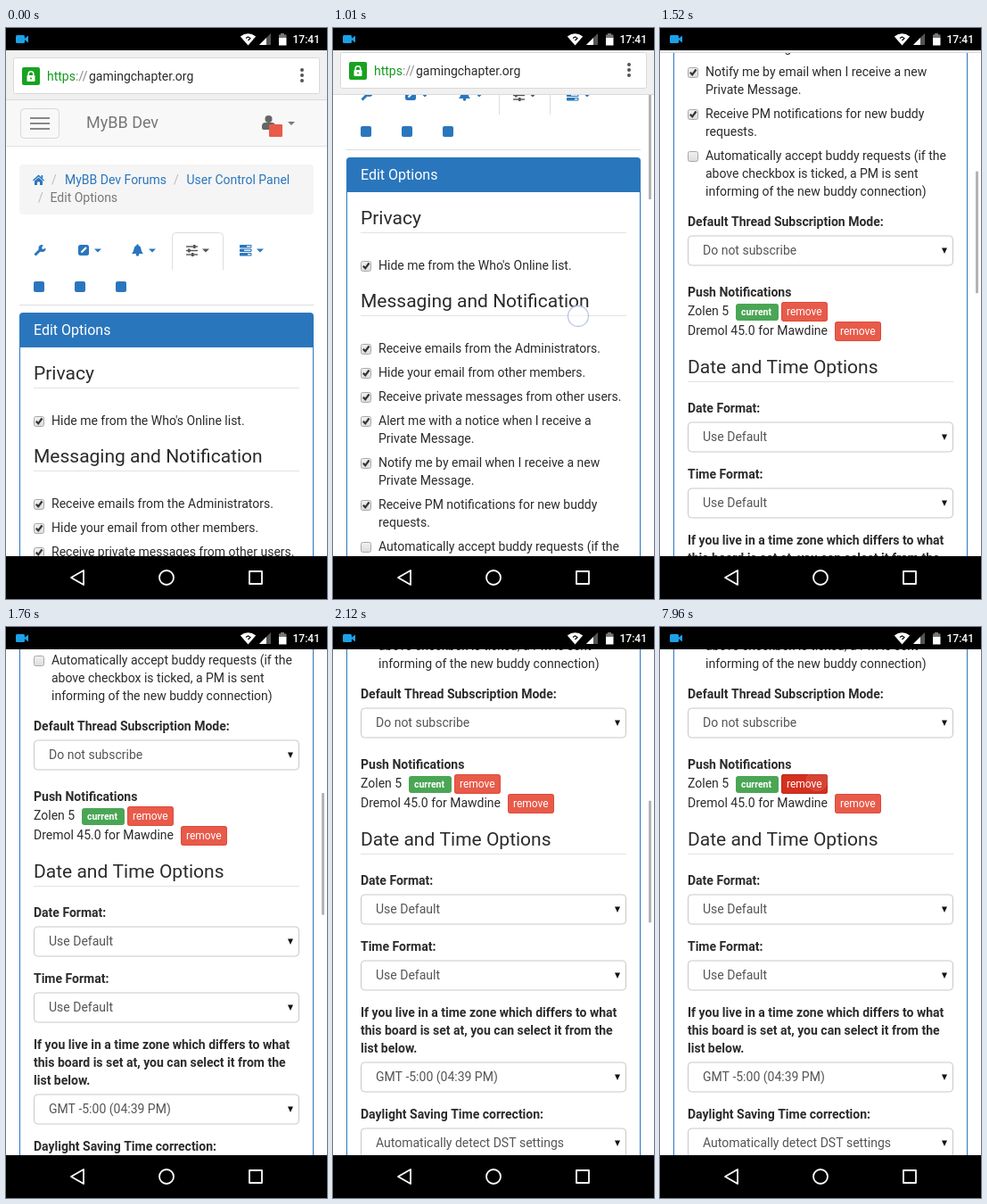
Write an HTML page with a canvas that moves like this. It is 360 px wide and 640 px high and loops after 7.99 s.

```html
<!DOCTYPE html>
<html lang="en">
<head>
<meta charset="utf-8">
<title>Options page scroll</title>
<style>
html, body { margin: 0; width: 100%; height: 100%; overflow: hidden; background: #000; }
canvas { display: block; width: 360px; height: 640px; }
</style>
</head>
<body>
<canvas id="stage"></canvas>
<script>
const W = 360, H = 640, LOOP = 7990;
const BLUE = '#2a76bd', INK = '#2b2b2b', GREY = '#555', RED = '#e85b4a', DARK_RED = '#d5301f';
const canvas = document.getElementById('stage');
const ratio = window.devicePixelRatio || 1;
canvas.width = W * ratio;
canvas.height = H * ratio;
const c = canvas.getContext('2d');

const clamp = (v, lo = 0, hi = 1) => Math.min(hi, Math.max(lo, v));
const ramp = (t, a, b) => clamp((t - a) / (b - a));
const mix = (a, b, k) => a + (b - a) * k;

// Drawing helpers
function text(str, x, y, size = 14, color = INK, weight = 400) {
  c.font = `${weight} ${size}px Roboto, sans-serif`;
  c.fillStyle = color;
  c.fillText(str, x, y);
}
function rect(x, y, w, h, color) {
  c.fillStyle = color;
  c.fillRect(x, y, w, h);
}
function box(x, y, w, h, r, fill, stroke) {
  c.beginPath();
  c.roundRect(x, y, w, h, r);
  if (fill) { c.fillStyle = fill; c.fill(); }
  if (stroke) { c.strokeStyle = stroke; c.lineWidth = 1; c.stroke(); }
}
function trace(points) {
  c.beginPath();
  points.forEach(([x, y], i) => i ? c.lineTo(x, y) : c.moveTo(x, y));
}
function poly(color, ...points) {
  trace(points);
  c.fillStyle = color;
  c.fill();
}
function line(color, width, ...points) {
  trace(points);
  c.strokeStyle = color;
  c.lineWidth = width;
  c.stroke();
}
function disc(x, y, r, fill, stroke, width = 1) {
  c.beginPath();
  c.arc(x, y, r, 0, Math.PI * 2);
  if (fill) { c.fillStyle = fill; c.fill(); }
  if (stroke) { c.strokeStyle = stroke; c.lineWidth = width; c.stroke(); }
}
const caret = (x, y, color) => poly(color, [x, y], [x + 8, y], [x + 4, y + 4]);

// Page widgets
function heading(str, y) {
  text(str, 31, y, 21);
  rect(31, y + 9, 298, 1, '#e2e2e2');
}
function checkbox(y, checked) {
  const g = c.createLinearGradient(0, y - 10, 0, y + 2);
  g.addColorStop(0, '#f2f2f2');
  g.addColorStop(1, '#dcdcdc');
  box(31.5, y - 9.5, 11, 11, 2, g, '#a8a8a8');
  if (checked) line('#333', 2.2, [33.8, y - 4.2], [36.2, y - 1.7], [40.5, y - 7.5]);
}
function option(y, lines, checked = true) {
  checkbox(y, checked);
  lines.forEach((str, i) => text(str, 51, y + i * 20));
}
const label = (str, y) => text(str, 31, y, 14, INK, 700);
function select(str, y) {
  box(31.5, y + .5, 297, 33, 4, '#fff', '#c8c8c8');
  text(str, 48, y + 21, 14, GREY);
  poly('#111', [316, y + 14], [322, y + 14], [319, y + 20.5]);
}
function removeButton(x, y, pressed = 0) {
  box(x, y, 52, 22, 3, RED);
  c.globalAlpha = pressed;
  box(x, y, 52, 22, 3, DARK_RED);
  c.globalAlpha = 1;
  box(x + .5, y + .5, 51, 21, 3, null, pressed > .5 ? '#b92a1a' : '#df4a38');
  text('remove', x + 6, y + 15, 12, '#fff');
}

function siteHeader() {
  rect(0, 81, W, 52, '#f8f8f8');
  rect(0, 132, W, 1, '#e4e4e4');
  box(16.5, 90.5, 43, 33, 4, null, '#d8d8d8');
  for (const y of [100, 106, 112]) rect(27, y, 22, 2, '#888');
  text('MyBB Dev', 90, 112, 18, '#777');
  disc(294.5, 102, 4, '#666');
  box(287, 106, 15, 8, [4, 4, 2, 2], '#666');
  box(295, 108, 15, 14, 1, RED);
  caret(316, 105, '#777');
}

function breadcrumb() {
  box(15, 153, 330, 56, 4, '#f5f5f5');
  poly(BLUE, [30, 170.5], [36.5, 164.5], [43, 170.5], [42, 171.5], [36.5, 166.5], [31, 171.5]);
  poly(BLUE, [32, 171.5], [36.5, 167.5], [41, 171.5], [41, 176], [38, 176], [38, 172.5], [35, 172.5], [35, 176], [32, 176]);
  rect(39.5, 165, 1.7, 3, BLUE);
  text('/', 51, 175, 14, '#bbb');
  text('MyBB Dev Forums', 66, 175, 14, BLUE);
  text('/', 188, 175, 14, '#bbb');
  text('User Control Panel', 202.5, 175, 14, BLUE);
  text('/', 36, 195, 14, '#bbb');
  text('Edit Options', 49.5, 195, 14, '#777');
}

function tabs() {
  rect(15, 310, 330, 1, '#ddd');
  box(186.5, 229.5, 57, 46, [4, 4, 0, 0], '#fff', '#ddd');
  rect(184, 271, 62, 8, '#fff');

  // wrench
  line(BLUE, 3, [32.5, 254.5], [39, 248]);
  disc(40.5, 247, 4, BLUE);
  poly('#fff', [40, 247], [42, 242], [46, 246], [41.5, 248]);

  // edit
  box(81, 243, 12, 12, 2.5, BLUE);
  line('#fff', 2.2, [84.5, 251.5], [90, 246]);
  caret(99, 247.5, BLUE);

  // bell
  c.beginPath();
  c.moveTo(141, 253);
  c.bezierCurveTo(145, 249, 142, 244, 147.5, 243.5);
  c.bezierCurveTo(153, 244, 150, 249, 154, 253);
  c.fillStyle = BLUE;
  c.fill();
  disc(147.5, 254, 1.8, BLUE);
  disc(147.5, 243.3, 1.1, BLUE);
  caret(160, 247.5, BLUE);

  // sliders
  [[245, 210], [249.5, 204], [254, 208]].forEach(([y, x]) => {
    rect(202, y - .7, 13, 1.4, GREY);
    rect(x, y - 2, 2.6, 4, GREY);
  });
  caret(220, 247.5, GREY);

  // tasks
  [[243, 270], [247.5, 267], [252, 271]].forEach(([y, x]) => {
    box(262, y, 13.5, 3.5, .7, BLUE);
    rect(x, y + 1.1, 274.5 - x, 1.3, '#fff');
  });
  caret(281, 247.5, BLUE);

  for (const x of [31, 77, 123]) box(x, 284, 12, 12, 2, BLUE);
}

function page(pressed) {
  siteHeader();
  breadcrumb();
  tabs();
  rect(15, 350, 1, 1100, BLUE);
  rect(344, 350, 1, 1100, BLUE);
  box(15, 319, 330, 39, [4, 4, 0, 0], BLUE);
  text('Edit Options', 31, 344, 16, '#fff');

  heading('Privacy', 394);
  option(445, ["Hide me from the Who's Online list."]);

  heading('Messaging and Notification', 487);
  option(538, ['Receive emails from the Administrators.']);
  option(565, ['Hide your email from other members.']);
  option(592, ['Receive private messages from other users.']);
  option(619, ['Alert me with a notice when I receive a', 'Private Message.']);
  option(666, ['Notify me by email when I receive a new', 'Private Message.']);
  option(713, ['Receive PM notifications for new buddy', 'requests.']);
  option(760, ['Automatically accept buddy requests (if the',
    'above checkbox is ticked, a PM is sent', 'informing of the new buddy connection)'], false);

  label('Default Thread Subscription Mode:', 834);
  select('Do not subscribe', 844.5);

  label('Push Notifications', 913);
  text('Zolen 5', 31, 934);
  box(85, 921, 48, 19, 3, '#4aa655');
  text('current', 91, 934, 10.5, '#fff', 700);
  removeButton(136, 919, pressed);
  text('Dremol 45.0 for Mawdine', 31, 956);
  removeButton(196, 941);

  heading('Date and Time Options', 999);
  label('Date Format:', 1043);
  select('Use Default', 1053.5);
  label('Time Format:', 1117);
  select('Use Default', 1127.5);
  label('If you live in a time zone which differs to what', 1191);
  label('this board is set at, you can select it from the', 1211);
  label('list below.', 1231);
  select('GMT -5:00 (04:39 PM)', 1241.5);
  label('Daylight Saving Time correction:', 1305);
  select('Automatically detect DST settings', 1315.5);
}

function addressBar() {
  rect(0, 25, W, 56, '#f0f0f0');
  rect(0, 80, W, 1, '#dadada');
  box(8.5, 33.5, 343, 40, 2, '#fff', '#d9d9d9');
  box(18, 44, 20, 20, 2, '#17a31f');
  box(23.5, 53, 9, 7, 1, '#fff');
  c.beginPath();
  c.arc(28, 51.5, 2.8, Math.PI, 0);
  c.lineTo(30.8, 54);
  c.moveTo(25.2, 51.5);
  c.lineTo(25.2, 54);
  c.strokeStyle = '#fff';
  c.lineWidth = 1.5;
  c.stroke();
  disc(28, 56.5, 1, '#17a31f');
  text('https', 46, 59, 14, '#149a1c');
  text('://', 78, 59, 14, '#888');
  text('gamingchapter.org', 93, 59, 14, INK);
  for (const y of [47, 53, 59]) disc(332, y, 2, GREY);
}

function systemBars() {
  rect(0, 0, W, 25, '#000');
  box(11, 8, 10, 9, 1.5, '#1da1e6');
  poly('#1da1e6', [20, 12.5], [25, 8.5], [25, 16.5]);

  c.beginPath();
  c.moveTo(271.5, 19.5);
  c.lineTo(262.8, 9.5);
  c.quadraticCurveTo(271.5, 3, 280.2, 9.5);
  c.closePath();
  c.fillStyle = '#fff';
  c.fill();
  line('#000', 1.2, [269, 11.5], [271.5, 10], [274, 11.5], [271.5, 14]);

  poly('#555', [284, 19], [297, 6], [297, 19]);
  poly('#fff', [284, 19], [292, 11], [292, 19]);
  rect(308, 6, 4, 2, '#777');
  rect(306, 7.5, 8.5, 4, '#777');
  rect(306, 11, 8.5, 8.5, '#fff');
  text('17:41', 321.5, 17, 12, '#fff', 500);

  rect(0, 592, W, 48, '#000');
  c.lineJoin = 'round';
  trace([[73, 616], [87, 608], [87, 624]]);
  c.closePath();
  c.strokeStyle = '#fff';
  c.lineWidth = 1.8;
  c.stroke();
  disc(180, 616, 8, null, '#fff', 1.8);
  c.strokeRect(273, 609, 14, 14);
  c.lineJoin = 'miter';
}

// Motion
function hermite(t, [t0, p0, v0], [t1, p1, v1]) {
  const d = t1 - t0, u = (t - t0) / d, u2 = u * u, u3 = u2 * u;
  return p0 * (2 * u3 - 3 * u2 + 1) + v0 * d * (u3 - 2 * u2 + u) +
    p1 * (3 * u2 - 2 * u3) + v1 * d * (u3 - u2);
}
const REST = [470, 0, 0], DRAG = [1010, 174, .3], RELEASE = [1160, 250, 1.41];
function scrollAt(t) {
  if (t < 500) return 0;
  if (t < DRAG[0]) return hermite(t, REST, DRAG);
  if (t < RELEASE[0]) return hermite(t, DRAG, RELEASE);
  return 754 - 36 * Math.pow(Math.max(0, 2120 - t) / 360, 2.69);
}
function barShift(t) {
  if (t < 1010) return 6 * ramp(t, 900, 1010);
  if (t < 1310) return mix(6, 28, ramp(t, 1010, 1310));
  return mix(28, 56, ramp(t, 1310, 1550));
}
function scrollbarAlpha(t) {
  if (t < 7120) return ramp(t, 500, 590);
  return t < 7240 ? .85 : t < 7330 ? .55 : t < 7480 ? .25 : 0;
}

function touch(x, y, alpha, fill) {
  if (alpha <= 0) return;
  c.globalAlpha = alpha;
  disc(x, y, 11.5, fill, '#b9c6e2', 1.3);
  c.globalAlpha = 1;
}
function swipeTouch(t, scroll) {
  if (t < 500) return;
  const drag = ramp(t, 500, 1010), tail = ramp(t, 1010, 1160);
  const x = mix(258, 275, drag) + 9 * tail;
  const y = t < 1010 ? 497 - scroll : mix(323, 280, tail);
  touch(x, y, 1 - ramp(t, 1180, 1340), 'rgba(255,255,255,.5)');
}
function tapTouch(t) {
  touch(176, 172, ramp(t, 7600, 7690) * (1 - .85 * ramp(t, 7810, 7960)), 'rgba(255,255,255,.6)');
}

function draw(time) {
  const start = time < 7630 ? 500 : 7630;
  const t = time < 500 || (time > 2120 && time < 7630) ? time : start + Math.floor((time - start) / 30) * 30;
  const scroll = Math.round(scrollAt(t)), shift = Math.round(barShift(t));
  c.setTransform(ratio, 0, 0, ratio, 0, 0);
  rect(0, 0, W, H, '#fff');

  c.save();
  c.translate(0, -scroll);
  page(ramp(t, 7720, 7870));
  c.restore();

  c.globalAlpha = scrollbarAlpha(t);
  box(354, 13.8 + .24 * scroll, 3, 136.5, 0, '#b4b4b4');
  c.globalAlpha = 1;

  c.save();
  c.translate(0, -shift);
  if (shift < 56) addressBar();
  c.restore();

  swipeTouch(t, scroll);
  tapTouch(t);
  systemBars();
}

const began = performance.now();
function tick() {
  draw((performance.now() - began) % LOOP);
  requestAnimationFrame(tick);
}
tick();
</script>
</body>
</html>
```
